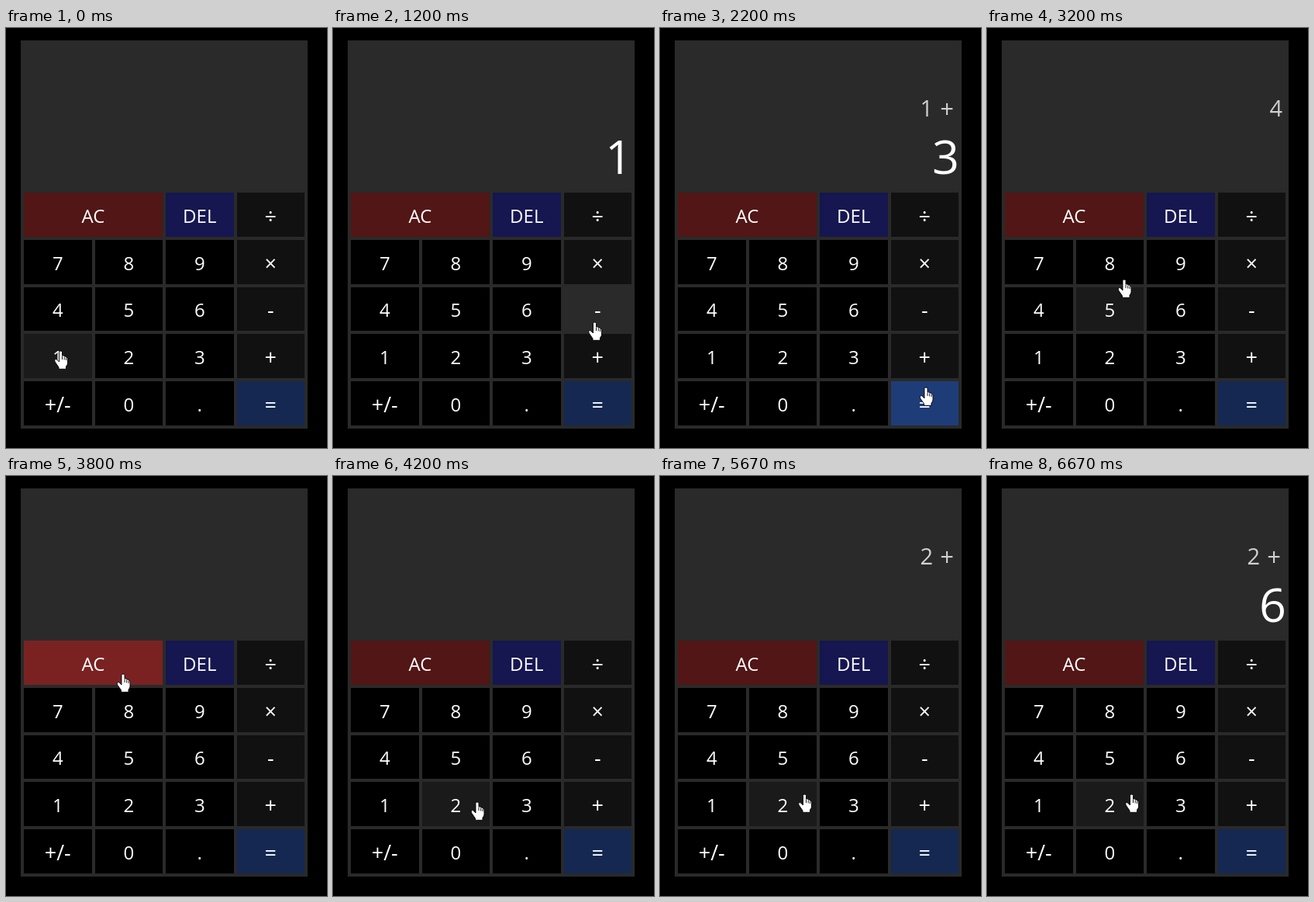
Write an HTML page with a canvas that moves like this. It is 414x541 px and loops after 8000 ms.

```html
<!DOCTYPE html>
<html lang="en">
<head>
<meta charset="utf-8">
<title>Calculator</title>
<style>
  html, body { margin: 0; width: 100%; height: 100%; overflow: hidden; background: #000; }
  canvas { display: block; }
</style>
</head>
<body>
<canvas id="stage" width="414" height="541"></canvas>
<script>
const ctx = document.getElementById('stage').getContext('2d');
const FONT = '"Open Sans", "Noto Sans", sans-serif';
const LOOP = 8000;
const TICK = 1000 / 15;
const HOLD = 100;

// idle, hover, pressed
const SKIN = {
  num: ['#000', '#1a1a1a', '#333'],
  op: ['#111', '#2a2a2a', '#444'],
  AC: ['#521616', '#7a2222', '#a32d2d'],
  DEL: ['#161650', '#222278', '#2d2da0'],
  '=': ['#142852', '#1e3c78', '#2850a0']
};

const keys = [];
function addKey(label, col, row, span = 1) {
  const left = 23 + 91.5 * col, top = 212 + 60.75 * row;
  const width = 91.5 * span - 4;
  const x = Math.round(left), y = Math.round(top);
  const symbol = /[-+÷×=]/.test(label);
  keys.push({
    label, x, y,
    w: Math.round(left + width) - x,
    h: Math.round(top + 56.75) - y,
    cx: left + width / 2,
    base: Math.round(top + 38.9) + (symbol ? 1 : 0),
    size: symbol ? 27 : 24,
    skin: SKIN[label] || SKIN[col === 3 ? 'op' : 'num']
  });
}
addKey('AC', 0, 0, 2);
addKey('DEL', 2, 0);
addKey('÷', 3, 0);
['7 8 9 ×', '4 5 6 -', '1 2 3 +', '+/- 0 . ='].forEach((line, r) =>
  line.split(' ').forEach((label, c) => addKey(label, c, r + 1)));

// pointer moves: start and end in ms, then where the fingertip lands
const HOME = [70.5, 416];
const MOVES = [
  [930, 1200, 337.5, 379], [1200, 1330, 344, 412], [1470, 1670, 256, 415],
  [1930, 2200, 343, 463], [2200, 2400, 343, 492],
  [3000, 3200, 177, 324], [3200, 3530, 151, 255],
  [3800, 4330, 188, 431], [4470, 4530, 186.5, 410]
];

const PRESSES = [
  [930, '1'], [1460, '+'], [1860, '3'], [2460, '='], [3660, 'AC'],
  [5130, '2'], [5560, '+'], [6530, '6']
];

const easeOut = u => 1 - (1 - u) ** 2;

function pointerAt(t) {
  let [x, y] = HOME;
  for (const [from, to, tx, ty] of MOVES) {
    const u = easeOut(Math.min(1, Math.max(0, (t - from) / (to - from))));
    x += (tx - x) * u;
    y += (ty - y) * u;
  }
  return [x, y];
}

// the screen follows from the keys pressed so far
function screenAt(t) {
  let operand = '', operator = '', entry = '';
  for (const [at, label] of PRESSES) {
    if (at > t) break;
    if (label === 'AC') {
      operand = operator = entry = '';
    } else if (label === '+') {
      [operand, operator, entry] = [entry, label, ''];
    } else if (label === '=') {
      [operand, operator, entry] = [String(+operand + +entry), '', ''];
    } else {
      entry += label;
    }
  }
  return { operand, operator, entry };
}

function text(str, x, y, size, align, color = '#fff', weight = 400) {
  ctx.font = `${weight} ${size}px ${FONT}`;
  ctx.textAlign = align;
  ctx.fillStyle = color;
  ctx.fillText(str, x, y);
}

function drawKeys(t) {
  const [px, py] = pointerAt(t - TICK); // hover trails the pointer
  const press = PRESSES.find(([at]) => t >= at && t < at + HOLD);
  for (const k of keys) {
    const hover = px >= k.x && px < k.x + k.w && py >= k.y && py < k.y + k.h;
    const pressed = press && press[1] === k.label;
    ctx.fillStyle = k.skin[pressed ? 2 : hover ? 1 : 0];
    ctx.fillRect(k.x, k.y, k.w, k.h);
    text(k.label, k.cx, k.base, k.size, 'center', '#fff', 500);
  }
}

function drawScreen(t) {
  const { operand, operator, entry } = screenAt(t);
  const soft = '#d0d0d0';
  text(operand, operator ? 352 : 381, 114, 29, 'right', soft);
  text(operator, 379, 115, 31, 'right', soft);
  text(entry, 386, 187.5, 61, 'right');
}

const hand = new Path2D(
  'M-2 1.5Q-2 0 0 0Q2 0 2 1.5V6Q4.6 5.4 5 7Q7 6.6 7.3 8.2Q9 8 9 10V16' +
  'Q9 18 7 20V23.3H-2.5V21L-7 14.5Q-8.5 12 -7.3 10.8Q-5.5 9.8 -3.6 12.4L-2 14Z');
const knuckles = new Path2D('M2 6.5V11M4.7 7.5V11.5M7.1 8.8V12');

function drawPointer(t) {
  const [x, y] = pointerAt(t);
  ctx.save();
  ctx.translate(Math.round(x * 2) / 2, Math.round(y));
  ctx.fillStyle = '#fff';
  ctx.strokeStyle = '#000';
  ctx.lineWidth = 0.9;
  ctx.fill(hand);
  ctx.stroke(hand);
  ctx.stroke(knuckles);
  ctx.restore();
}

function draw(now) {
  // the picture advances at 15 steps per second
  const t = Math.floor((now % LOOP + 4) / TICK) * TICK % LOOP;
  ctx.fillStyle = '#000';
  ctx.fillRect(0, 0, 414, 541);
  ctx.fillStyle = '#2a2a2a';
  ctx.fillRect(19, 16, 370, 500);
  drawScreen(t);
  drawKeys(t);
  drawPointer(t);
}

const start = performance.now();
function loop() {
  draw(performance.now() - start);
  requestAnimationFrame(loop);
}
loop();
</script>
</body>
</html>
```
